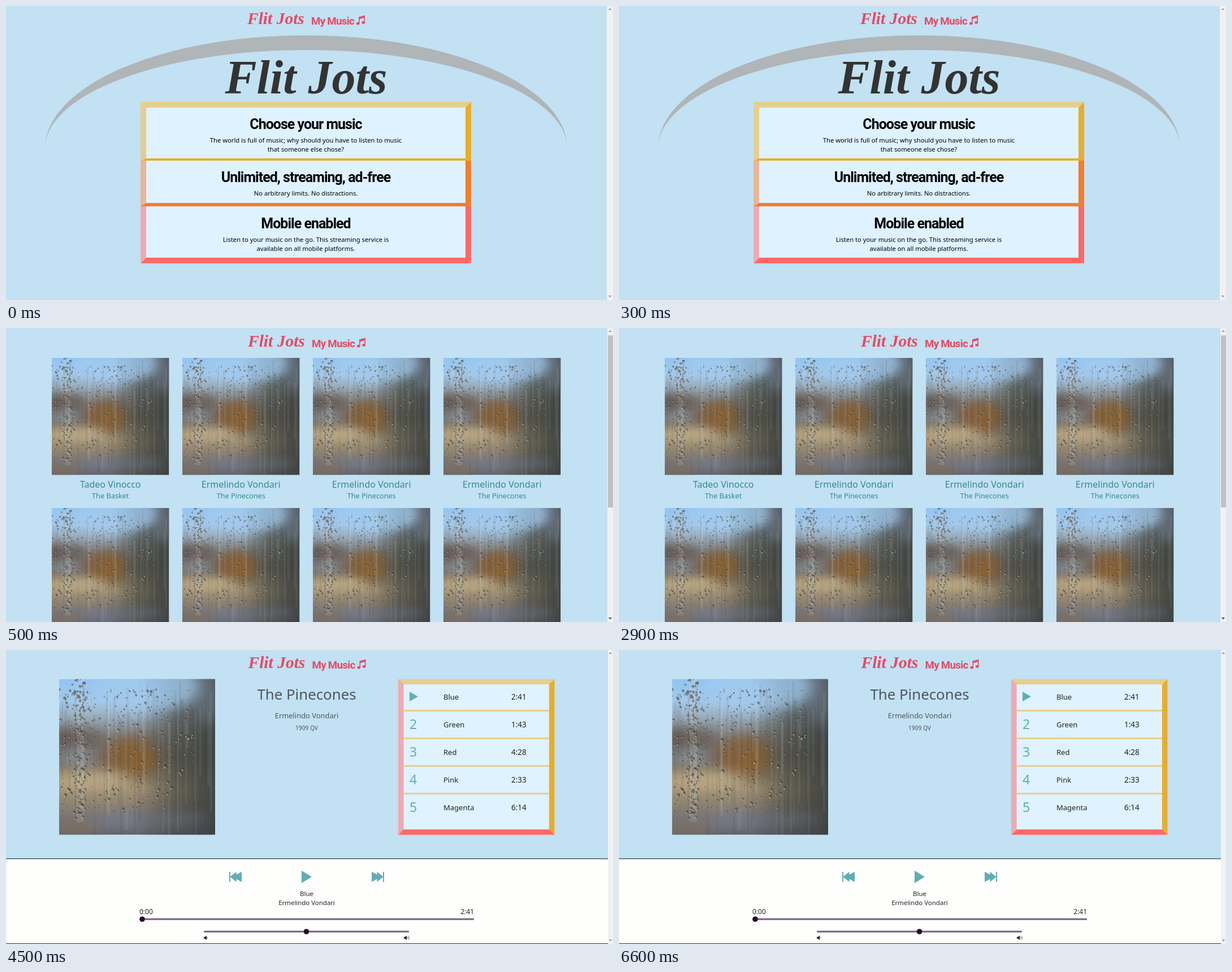
Recreate the animation shown at these times as an HTML page. Size 1074 by 521 pixels, loop 8 s.

```html
<!DOCTYPE html>
<html lang="en">
<head>
<meta charset="utf-8">
<title>Music player walkthrough</title>
<style>
  html, body { margin: 0; width: 100%; height: 100%; overflow: hidden; background: #c2e1f3; }
  svg { display: block; width: 100%; height: 100%; }
  text { font-family: "Noto Sans", "Open Sans", sans-serif; }
  .brand { font: italic bold 29.5px "Liberation Serif", serif; }
  .head { font-family: Roboto, "Liberation Sans", sans-serif; font-weight: bold; letter-spacing: -.04em; }
  .copy { font-weight: 500; }
</style>
</head>
<body>
<svg id="stage" viewBox="0 0 1074 521"></svg>
<script>
const LOOP = 8000;
const BRAND = "Flit Jots", ARTIST = "Ermelindo Vondari", ALBUM = "The Pinecones";
const SKY = "#c2e1f3", PANEL = "#dff2ff", SAND = "#e5cf8f", GOLD = "#e8ad2c",
  CORAL = "#ff6868", BLUSH = "#f0a9b2", TEAL = "#62adb3", PINK = "#e84862",
  LINK = "#358a93", SLATE = "#4f565c", INK = "#222";

const rect = (x, y, w, h, fill, extra = "") =>
  `<rect x="${x}" y="${y}" width="${w}" height="${h}" fill="${fill}" ${extra}/>`;
const path = (d, fill, extra = "") => `<path d="${d}" fill="${fill}" ${extra}/>`;
const oval = (x, y, rx, ry, fill, extra = "") =>
  `<ellipse cx="${x}" cy="${y}" rx="${rx}" ry="${ry}" fill="${fill}" ${extra}/>`;
const text = (s, x, y, size, fill, anchor = "start", cls = "") =>
  `<text x="${x}" y="${y}" style="font-size:${size}px" fill="${fill}" text-anchor="${anchor}" class="${cls}">${s}</text>`;
const times = (n, make) => Array.from({ length: n }, (_, i) => make(i)).join("");

function randomFrom(seed) {
  return () => (seed = (seed * 16807) % 2147483647) / 2147483647;
}

// Box with mitred borders; sizes and colours run top, right, bottom, left.
function bevel(x, y, w, h, [t, r, b, l], [ct, cr, cb, cl]) {
  const X = x + w, Y = y + h, il = x + l, ir = X - r, it = y + t, ib = Y - b;
  return rect(il, it, ir - il, ib - it, PANEL) +
    path(`M${x} ${y}H${X}L${ir} ${it}H${il}z`, ct) +
    path(`M${X} ${y}V${Y}L${ir} ${ib}V${it}z`, cr) +
    path(`M${x} ${Y}H${X}L${ir} ${ib}H${il}z`, cb) +
    path(`M${x} ${y}V${Y}L${il} ${ib}V${it}z`, cl);
}

function gradient(id, stops, axis = 'x2="0" y2="1"') {
  const list = stops.map(([at, color, alpha = 1]) =>
    `<stop offset="${at}" stop-color="${color}" stop-opacity="${alpha}"/>`).join("");
  return `<linearGradient id="${id}" ${axis}>${list}</linearGradient>`;
}

// Rain on a window: blurred scenery, wet streaks and beads of water.
function photoDefs() {
  const rnd = randomFrom(4217);
  const bead = (x, y, r, alpha) =>
    oval(x.toFixed(1), y.toFixed(1), r.toFixed(2), (r * 1.3).toFixed(2), "#3a332d", `opacity="${alpha}"`) +
    oval((x - r * .4).toFixed(1), (y + r * .8).toFixed(1), (r * .7).toFixed(2), (r * .7).toFixed(2), "#d6d4cc", `opacity="${alpha}"`);
  const streaks = times(60, () =>
    rect((rnd() * 205).toFixed(1), (rnd() * 60).toFixed(0), (1 + rnd() * 3).toFixed(1), (60 + rnd() * 130).toFixed(0),
      rnd() < .5 ? "#cfdce6" : "#2c3238", 'opacity=".08"'));
  const scattered = times(560, () => {
    const y = 14 + Math.pow(rnd(), 1.1) * 165;
    return bead(rnd() * (y > 130 ? 150 : 180), y, .4 + rnd() * rnd() * 1.7, .55);
  });
  const trail = times(170, () =>
    bead(28 + (rnd() + rnd() - 1) * 11, rnd() * 185, .5 + rnd() * 1.4, .5));
  return `<defs>
    ${gradient("scene", [[0, "#92c5f2"], [.14, "#a3c9ea"], [.25, "#99abba"], [.37, "#807d7b"],
      [.5, "#6e645b"], [.6, "#8b7d68"], [.7, "#a49375"], [.82, "#8b8071"], [.92, "#70717b"], [1, "#63646b"]])}
    ${gradient("shade", [[.5, "#44453f", 0], [.72, "#45473f", .65], [1, "#3b3f3e", .92]], 'x2="1" y2="0"')}
    <filter id="soft" x="-50%" y="-50%" width="200%" height="200%"><feGaussianBlur stdDeviation="8"/></filter>
    <symbol id="photo" viewBox="0 0 207 207">
      ${rect(0, 0, 207, 207, "url(#scene)")}
      <g filter="url(#soft)">
        ${oval(15, 80, 45, 14, "#6b615b")}
        ${oval(22, 105, 30, 8, "#8f979f")}
        ${oval(98, 104, 38, 28, "#8a6236", 'opacity=".85"')}
        ${oval(112, 108, 16, 16, "#966833", 'opacity=".7"')}
        ${oval(42, 134, 55, 8, "#c4b18a")}
        ${oval(110, 186, 75, 7, "#777a87")}
        ${oval(20, 196, 38, 9, "#7d7061")}
      </g>
      ${rect(0, 0, 207, 207, "url(#shade)")}
      <g filter="url(#soft)">
        ${oval(115, 10, 72, 34, "#a2caee", 'opacity=".75"')}
        ${oval(196, 20, 16, 40, "#717e8b", 'opacity=".6"')}
        ${oval(155, 186, 45, 7, "#6c6f7a", 'opacity=".6"')}
      </g>
      ${rect(23, 0, 10, 190, "#d5d9d9", 'opacity=".15"')}
      ${streaks}${scattered}${trail}
    </symbol></defs>`;
}
const photo = (x, y, size) => `<use href="#photo" x="${x}" y="${y}" width="${size}" height="${size}"/>`;

function header(dx, dy) {
  const note = "M624 19.5L635 16.5V29.5H633.4V21L625.6 23V31.5H624z";
  return `<g transform="translate(${dx} ${dy})">` +
    text(BRAND, 427, 32, 29.5, PINK, "start", "brand") +
    text("My Music", 540, 32.5, 18.8, PINK, "start", "head") +
    path(note, PINK) + oval(622.7, 31, 2.8, 2.3, PINK) + oval(632.2, 29.3, 2.8, 2.3, PINK) + "</g>";
}

function scrollbar(x, thumb) {
  const mid = (x + 1074) / 2;
  return rect(x, 0, 1074 - x, 521, "#f1f1f1") +
    (thumb ? rect(x + 1, 13, 1073 - x, 305, "#c1c1c1") : "") +
    path(`M${mid - 3} 7l3 -3.5l3 3.5z`, "#a3a3a3") +
    path(`M${mid - 3} 513l3 3.5l3 -3.5z`, thumb ? "#505050" : "#a3a3a3");
}

function landing() {
  const title = (s, y) => text(s, 530.5, y, 25, "#000", "middle", "head");
  const copy = (s, y) => text(s, 530.5, y, 11.2, "#000", "middle", "copy");
  return header(0, 0) +
    path("M69 252A462 200 0 0 1 993 252A462 174 0 0 0 69 252z", "#b0b5b7") +
    text(BRAND, 531, 155, 84, "#333", "middle", "brand") +
    bevel(238, 170, 585, 104, [10, 10, 4, 10], [SAND, GOLD, GOLD, SAND]) +
    bevel(238, 274, 585, 81, [0, 10, 6, 10], [SAND, "#f47d29", "#f47d29", "#e9b696"]) +
    bevel(238, 355, 585, 101, [0, 10, 10, 10], [SAND, CORAL, CORAL, BLUSH]) +
    title("Choose your music", 218) +
    copy("The world is full of music; why should you have to listen to music", 242) +
    copy("that someone else chose?", 258) +
    title("Unlimited, streaming, ad-free", 312) +
    copy("No arbitrary limits. No distractions.", 336) +
    title("Mobile enabled", 393.5) +
    copy("Listen to your music on the go. This streaming service is", 417.5) +
    copy("available on all mobile platforms.", 433.5) +
    scrollbar(1063, false);
}

function collection() {
  const card = i => {
    const x = 81 + (i % 4) * 231, y = i < 4 ? 53 : 319, mid = x + 103.7;
    return photo(x, y, 207.4) +
      text(i ? ARTIST : "Tadeo Vinocco", mid, y + 230, 16, LINK, "middle") +
      text(i ? ALBUM : "The Basket", mid, y + 248.5, 12.7, LINK, "middle");
  };
  return header(1, 1) + times(8, card) + scrollbar(1064, true);
}

function album() {
  const songs = [["Blue", "2:41"], ["Green", "1:43"], ["Red", "4:28"], ["Pink", "2:33"], ["Magenta", "6:14"]];
  const row = ([name, length], i) => {
    const y = 88 + i * 49;
    return (i ? rect(704, y - 31, 257, 3, SAND) + text(i + 1, 714, y + 2.5, 23, TEAL)
              : path("M714 74L729 82.5L714 91z", TEAL)) +
      text(name, 774, y, 13, INK) + text(length, 894, y, 13.5, INK);
  };
  return header(1.5, 0) + photo(94, 51.5, 276) +
    text(ALBUM, 532, 88, 25.8, SLATE, "middle") +
    text(ARTIST, 532, 121, 12.9, SLATE, "middle") +
    text("1909 QV", 532, 141.5, 10.2, SLATE, "middle") +
    bevel(694, 51.5, 276.5, 276, [9.5, 9.5, 9.5, 9.5], [SAND, GOLD, CORAL, BLUSH]) +
    songs.map(row).join("") + player() + scrollbar(1065, false);
}

function player() {
  const skip = "M0 0h2v8.5L12.5 0v5L22 0v18L12.5 13v5L2 9.5V18H0z";
  const slider = (x, y, w, knob) =>
    rect(x, y - 1.5, w, 3, "#75637f", 'rx="1"') + oval(knob, y, 4.8, 4.8, "#280d2b");
  const speaker = x => path(`M${x} 508.5h2l3 -2.5v8l-3 -2.5h-2z`, "#222");
  const wave = (x, r) => path(`M${x} ${510 - r}q${r} ${r} 0 ${2 * r}`, "none", 'stroke="#444" stroke-width=".8"');
  return rect(0, 369, 1065, 152, "#fefefd") + rect(0, 369, 1065, 1.6, "#4b6670") +
    path(skip, TEAL, 'transform="translate(395 393)"') +
    path("M523 391L541 402L523 413z", TEAL) +
    path(skip, TEAL, 'transform="translate(669 393) scale(-1 1)"') +
    text("Blue", 532, 436, 11.5, INK, "middle") +
    text(ARTIST, 532, 452, 11.4, INK, "middle") +
    text("0:00", 236, 467.5, 12, INK) + text("2:41", 828, 467.5, 12, INK, "end") +
    slider(236, 477, 592, 241) + slider(350, 499, 363, 531.5) +
    speaker(350) + wave(356, 1.5) +
    speaker(704) + wave(710, 2) + wave(711.5, 3.5) +
    rect(0, 520, 1065, 1, "#2b2b30");
}

const scenes = [
  { start: 0, draw: landing },
  { start: 500, draw: collection },
  { start: 4500, draw: album },
];
const stage = document.getElementById("stage");
stage.innerHTML = photoDefs() + rect(0, 0, 1074, 521, SKY) +
  scenes.map(s => `<g class="scene">${s.draw()}</g>`).join("");
const groups = [...stage.querySelectorAll(".scene")];

function update(time) {
  const t = time % LOOP;
  const current = scenes.filter(s => s.start <= t).length - 1;
  groups.forEach((g, i) => { g.style.display = i === current ? "" : "none"; });
}

const origin = performance.now();
function tick() {
  update(performance.now() - origin);
  requestAnimationFrame(tick);
}
tick();
</script>
</body>
</html>
```
